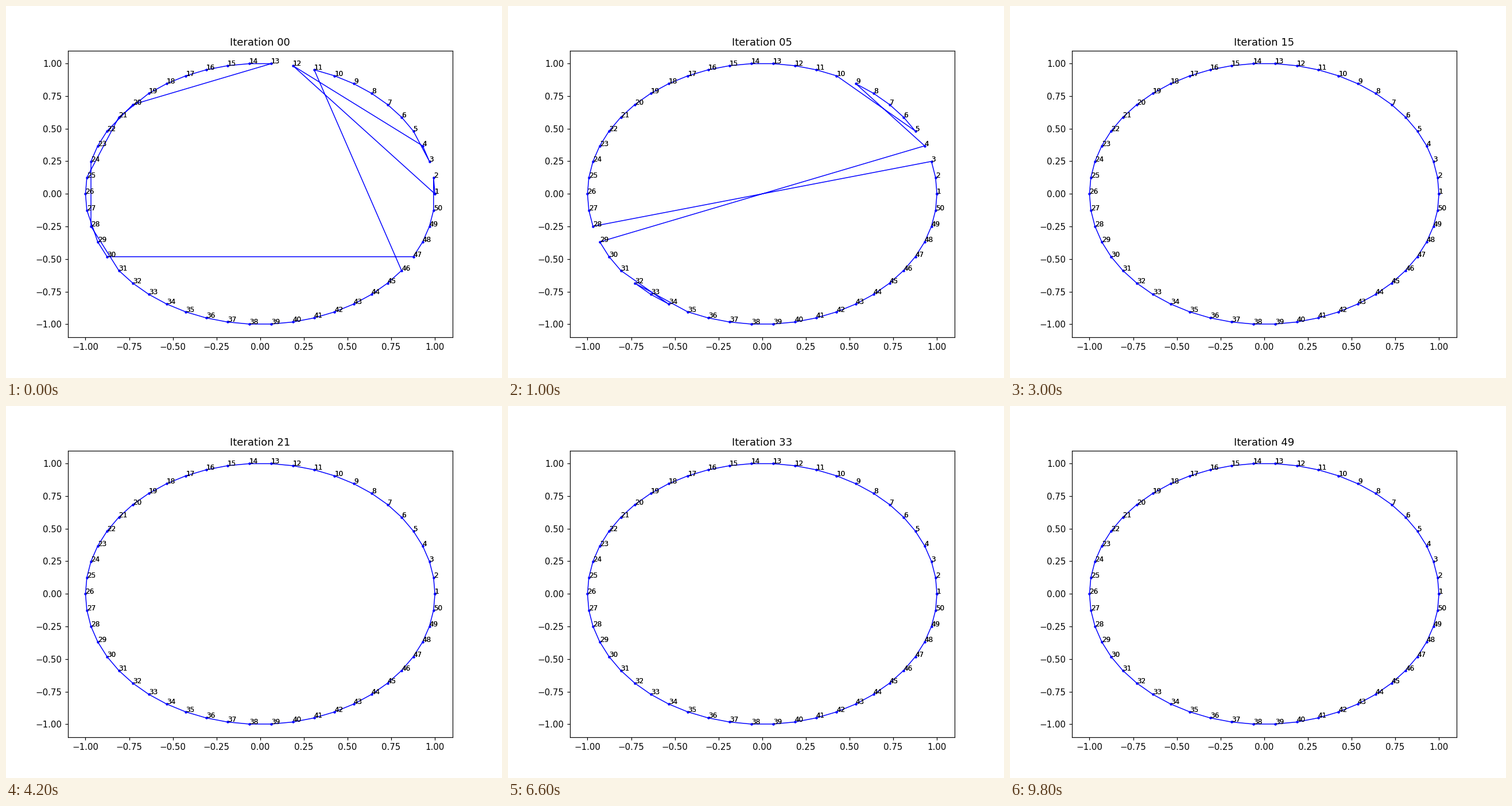
A matplotlib script that plays this animation: 864 px wide and 648 px high, repeating every 10000 ms.

```python
import numpy as np
import matplotlib.pyplot as plt
from matplotlib.animation import FuncAnimation

N_CITIES = 50
N_FRAMES = 50

# Each stage of the search: first iteration -> visiting order as runs of cities.
STAGES = {
    0: "1-2 50-47 30-29 27-25 21 19-13 20 22-24 28 31-46 11-5 3-4 12",
    1: "1-2 50-47 30-13 31-46 11-5 3-4 12",
    2: "1 49-50 42 10-9 7-2 8 31-29 27-28 26-11 34-32 35-39 41-40 43-48",
    3: "1 49-50 42 10-9 7-2 8 11-26 28-27 29-31 34-32 35-39 41-40 43-48",
    4: "1 49-50 10-9 7-2 8 11-31 34-32 35-48",
    5: "1-3 28-10 5-9 4 29-31 34-32 35-50",
    6: "1-3 28-10 5-9 4 29-50",
    7: "1-4 9-5 10-50",
    11: "1-50",
}


def expand(spec):
    """Turn '1-3 9-7' into the closed tour 1 2 3 9 8 7 1 (zero based)."""
    tour = []
    for run in spec.split():
        ends = [int(v) for v in run.split("-")]
        a, b = ends[0], ends[-1]
        step = 1 if b >= a else -1
        tour.extend(range(a - 1, b - 1 + step, step))
    return np.array(tour + tour[:1])


TOURS = {start: expand(spec) for start, spec in STAGES.items()}


def tour_at(i):
    return TOURS[max(start for start in TOURS if start <= i)]


angle = 2 * np.pi * np.arange(N_CITIES) / N_CITIES
cx, cy = np.cos(angle), np.sin(angle)

plt.rcParams["font.family"] = "DejaVu Sans"
fig, ax = plt.subplots(figsize=(8, 6), dpi=108)
first = tour_at(0)
path, = ax.plot(cx[first], cy[first], "o-", color="blue",
                linewidth=1, markersize=2)

# Every city belongs to two edges, and each edge labels its ends.
for k in range(N_CITIES):
    for _ in range(2):
        ax.text(cx[k], cy[k], str(k + 1), fontsize=8)

title = ax.set_title("Iteration 00")


def update(i):
    tour = tour_at(i)
    path.set_data(cx[tour], cy[tour])
    title.set_text(f"Iteration {i:02d}")
    return path, title


anim = FuncAnimation(fig, update, frames=N_FRAMES, interval=200,
                     repeat=True, repeat_delay=0, blit=False)
plt.show()
```
